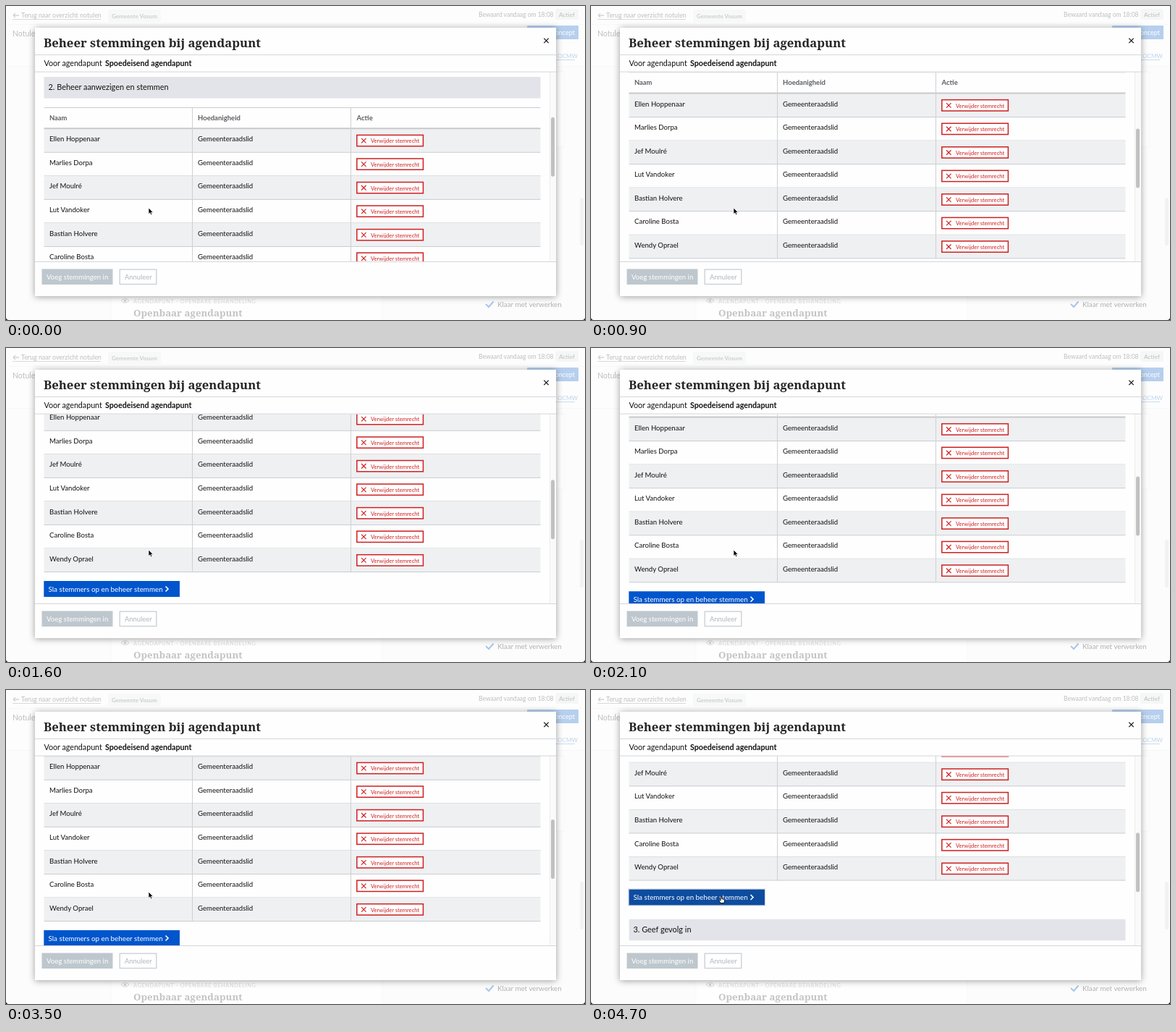
An HTML page that plays this animation: 800 px wide and 434 px high, repeating every 4.8 s.

```html
<!DOCTYPE html>
<html lang="nl">
<head>
<meta charset="utf-8">
<title>Beheer stemmingen</title>
<style>
html, body { margin: 0; width: 100%; height: 100%; overflow: hidden; background: #fdfdfd; }
svg { display: block; width: 800px; height: 434px; }
text { font-family: Lato, "Open Sans", sans-serif; white-space: pre; }
.slab { font-family: "Noto Serif", serif; font-weight: 700; }
.bold { font-weight: 700; }
</style>
</head>
<body>
<svg id="stage" viewBox="0 0 800 434" xmlns="http://www.w3.org/2000/svg">
  <defs>
    <clipPath id="view"><rect x="40" y="91.5" width="711" height="261.5"/></clipPath>
    <filter id="shadow" x="-10%" y="-10%" width="120%" height="125%">
      <feDropShadow dx="0" dy="1" stdDeviation="5" flood-color="#000" flood-opacity=".38"/>
    </filter>
  </defs>
  <g id="page"></g>
  <rect x="40" y="30" width="720" height="371" fill="#fefefe" filter="url(#shadow)"/>
  <g clip-path="url(#view)"><g id="content"></g></g>
  <g id="frame"></g>
  <rect id="thumb" x="753" width="5" height="82" rx="2.5" fill="#c1c1c1"/>
  <path id="arrow" d="M0 0V8.6L2 6.8L3.4 9.8L4.9 9.1L3.5 6.2H6.2Z" fill="#000" stroke="#fff" stroke-width=".7"/>
  <path id="hand" d="M-.9 .2Q0 -.8 .9 .2V3.2L4 4Q4.8 4.4 4.6 5.5L3.8 9H-.8L-3.2 5.4Q-3 4.2 -1.8 4.8L-.9 5.6Z" fill="#fff" stroke="#000" stroke-width=".9"/>
  <path d="M0 430Q0 434 4 434H0ZM800 430Q800 434 796 434H800Z" fill="#111"/>
</svg>
<script>
const NS = "http://www.w3.org/2000/svg";
const $ = id => document.getElementById(id);

function add(parent, tag, attrs) {
  const node = document.createElementNS(NS, tag);
  for (const key in attrs) node.setAttribute(key, attrs[key]);
  parent.append(node);
  return node;
}
const box = (parent, x, y, width, height, fill, more) =>
  add(parent, "rect", { x, y, width, height, fill, ...more });
const stroke = (parent, d, color, width = 1) =>
  add(parent, "path", { d, stroke: color, "stroke-width": width, fill: "none" });
function label(parent, x, y, size, fill, text, more) {
  add(parent, "text", { x, y, "font-size": size, fill, ...more }).textContent = text;
}
const bold = { class: "bold" };
const slab = { class: "slab" };

function drawPage() {
  const g = $("page"), ink = "#bebebe", link = "#bdd3ee";
  box(g, 0, 0, 800, 434, "#fdfdfd");
  box(g, 0, 84, 800, 350, "#fcfcfc");
  stroke(g, "M0 25.5H800M0 83.5H800", "#f8f8f8");
  box(g, 600, 91, 171, 104, "#fefefe", { stroke: "#f6f6f6" });
  box(g, 145, 380, 375, 60, "#fefefe", { stroke: "#f8f8f8" });
  stroke(g, "M10 13H18M13 10L10 13L13 16", ink);
  label(g, 21, 16, 8.9, ink, "Terug naar overzicht notulen");
  stroke(g, "M9 18.5H131", "#cacaca", .7);
  box(g, 141, 5, 73, 17, "#f7f8f8", { rx: 2 });
  label(g, 146, 16.5, 8, "#cbced1", "Gemeente Vosum", bold);
  label(g, 653, 15, 8.5, ink, "Bewaard vandaag om 18:08");
  box(g, 759, 4, 32, 15, "#f5f6f6", { rx: 2 });
  label(g, 764, 15, 8.4, ink, "Actief");
  label(g, 9, 42, 10.5, ink, "Notulen");
  box(g, 720, 27, 71, 19, "#b6cfee", { rx: 1 });
  label(g, 786, 40, 9, "#fff", "concept", { "text-anchor": "end" });
  label(g, 762, 72, 8.2, link, "OCMW");
  stroke(g, "M760 74.5H786", link, .8);
  box(g, 793, 265, 5, 66, "#f2f2f2", { rx: 2.5 });
  stroke(g, "M159 407.5Q164.500 401.500 170 407.500Q164.500 413 159 407.500Z", "#d6d6d6");
  add(g, "circle", { cx: 164.5, cy: 407.3, r: 1.6, fill: "#d0d0d0" });
  label(g, 176, 411, 7.4, "#dcddde", "AGENDAPUNT - OPENBARE BEHANDELING", { "letter-spacing": .6 });
  label(g, 176, 429, 13.3, "#c4c4c4", "Openbaar agendapunt", slab);
  stroke(g, "M663 412L667 416L673.500 408.500", "#a9c6ea", 2);
  label(g, 679, 415.5, 9.8, "#b0b0b0", "Klaar met verwerken");
}

const names = ["Ellen Hoppenaar", "Marlies Dorpa", "Jef Moulré", "Lut Vandoker",
  "Bastian Holvere", "Caroline Bosta", "Wendy Oprael"];
const rowTop = 169.7, rowHeight = 32.55, saveTop = 410;
let saveButton, focusRing;

function sectionBar(g, y, text) {
  box(g, 52.5, y, 686, 29.5, "#e3e4e9");
  label(g, 58.5, y + 18.3, 10.9, "#111", text);
}

function drawRow(g, name, i) {
  const y = rowTop + i * rowHeight, red = "#cf2020";
  if (i % 2 === 0) box(g, 52.5, y, 686, rowHeight, "#eff0f2");
  label(g, 60, y + 17.6, 9.6, "#111", name);
  label(g, 265, y + 17.6, 9.6, "#111", "Gemeenteraadslid");
  box(g, 484.8, y + 8.7, 91.6, 15.3, "#fff", { stroke: red, "stroke-width": 1.5 });
  stroke(g, `M491 ${y + 13.2}l6.500 6.500m0 -6.500l-6.500 6.500`, red, 1.2);
  label(g, 504, y + 19.7, 7.6, red, "Verwijder stemrecht");
  stroke(g, `M52.500 ${y + rowHeight}H738.500`, "#c9ccd1");
}

function drawContent() {
  const g = $("content"), head = "#5a5d61";
  sectionBar(g, 98, "2. Beheer aanwezigen en stemmen");
  stroke(g, "M52.500 140.500H738.500", "#c9ccd1");
  label(g, 60, 157.8, 9.3, head, "Naam", bold);
  label(g, 265, 157.8, 9.5, head, "Hoedanigheid", bold);
  label(g, 484.5, 157.8, 9.5, head, "Actie", bold);
  names.forEach((name, i) => drawRow(g, name, i));
  stroke(g, `M52.500 ${rowTop - .5}H738.500`, "#c9c9cc", 2);
  stroke(g, `M257.500 140V${rowTop + 7 * rowHeight}M476.500 140V${rowTop + 7 * rowHeight}`, "#cdd0d4");
  saveButton = box(g, 52.3, saveTop, 187.7, 22, "#0055cc");
  focusRing = box(g, 52, saveTop - .5, 188.5, 23, "none",
    { stroke: "#b7bfd6", "stroke-width": 1.2, "stroke-dasharray": "1.5 1" });
  label(g, 58.5, saveTop + 14.7, 9.8, "#fff", "Sla stemmers op en beheer stemmen");
  stroke(g, `M220.500 ${saveTop + 7.5}l3.500 3.500l-3.500 3.500`, "#fff", 1.6);
  sectionBar(g, 451.3, "3. Geef gevolg in");
}

function drawFrame() {
  const g = $("frame"), line = "#d3d6da";
  label(g, 52, 57, 16.7, "#262626", "Beheer stemmingen bij agendapunt", slab);
  stroke(g, "M743.300 44.700l6.400 6.400m0 -6.400l-6.400 6.400", "#111", 1.2);
  label(g, 52.5, 82.5, 10.7, "#111", "Voor agendapunt");
  label(g, 137, 82.5, 10.7, "#111", "Spoedeisend agendapunt", bold);
  box(g, 751, 91, 9, 262, "#fafafa");
  stroke(g, "M751.500 91V353", "#ececec");
  stroke(g, "M40 67.500H760M40 91H760M40 353.500H760", line);
  box(g, 49.5, 363.5, 98, 21.5, "#bec7cd");
  label(g, 56, 378, 9.6, "#fff", "Voeg stemmingen in");
  box(g, 157.2, 364.2, 50.6, 20.3, "#fff", { stroke: "#c8cfd4", "stroke-width": 1.3 });
  label(g, 164, 378, 9.4, "#adb6bd", "Annuleer");
}

// Scroll offset by time; the slope is zero at each turning point.
const scrollKeys = [[0, 0], [400, 27.5], [1200, 62], [1600, 88], [1800, 92],
  [2500, 45.5], [3500, 78], [4200, 134.5], [4800, 134.5]];

function slope(i) {
  const a = scrollKeys[i - 1], b = scrollKeys[i], c = scrollKeys[i + 1];
  if (!a || !c) return 0;
  const left = (b[1] - a[1]) / (b[0] - a[0]), right = (c[1] - b[1]) / (c[0] - b[0]);
  return left * right <= 0 ? 0 : 2 * left * right / (left + right);
}

function scrollAt(t) {
  let i = 0;
  while (i < scrollKeys.length - 2 && t >= scrollKeys[i + 1][0]) i++;
  const [t0, y0] = scrollKeys[i], [t1, y1] = scrollKeys[i + 1];
  const span = t1 - t0, u = (t - t0) / span, v = 1 - u;
  return v * v * (1 + 2 * u) * y0 + u * u * (3 - 2 * u) * y1
    + span * u * v * (v * slope(i) - u * slope(i + 1));
}

function render(ms) {
  const t = Math.floor(ms % 4800 / 100) * 100;
  const scroll = scrollAt(t);
  const u = Math.min(1, Math.max(0, (t - 4200) / 300)), move = u * u * (3 - 2 * u);
  const x = 197 - 17 * move, y = 279 + 6.5 * move;
  const hover = y >= saveTop - scroll && y <= saveTop + 22 - scroll;
  $("content").setAttribute("transform", `translate(0 ${-scroll})`);
  $("thumb").setAttribute("y", 153.8 + scroll * .323);
  saveButton.setAttribute("fill", hover ? "#0d4c9f" : "#0055cc");
  focusRing.setAttribute("visibility", t >= 4600 ? "visible" : "hidden");
  for (const [id, shown] of [["arrow", !hover], ["hand", hover]]) {
    $(id).setAttribute("transform", `translate(${x} ${y})`);
    $(id).setAttribute("visibility", shown ? "visible" : "hidden");
  }
}

drawPage();
drawContent();
drawFrame();
const start = performance.now();
function tick() {
  render(performance.now() - start);
  requestAnimationFrame(tick);
}
tick();
</script>
</body>
</html>
```
